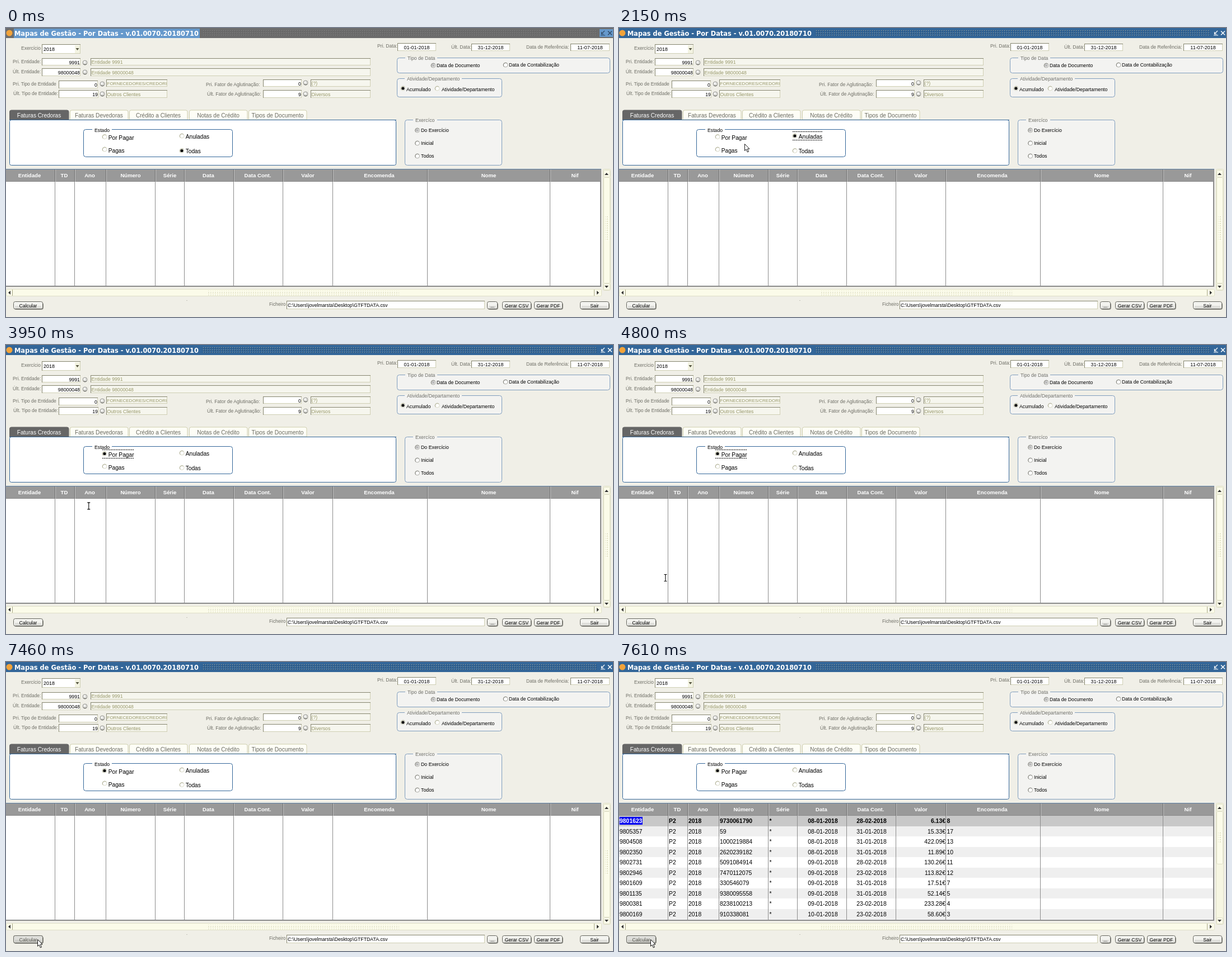
Write an HTML page that moves like this. It is 1084 by 517 pixels and loops after 8000 ms.

```html
<!DOCTYPE html>
<html lang="pt">
<head>
<meta charset="utf-8">
<title>Mapas de Gestão</title>
<style>
html, body { margin: 0; width: 100%; height: 100%; overflow: hidden; background: #f0efe7; }
svg { display: block; width: 100vw; height: 100vh; font-family: "Liberation Sans", Arial, sans-serif; }
text { white-space: pre; }
</style>
</head>
<body>
<svg id="stage" viewBox="0 0 1084 517"></svg>
<script>
const LOOP = 8000;
const BLUE = '#336699', GREY = '#6e6e66', OLIVE = '#98986a', BG = '#f0efe7', CREAM = '#fbfbe9';
const RIM = '#dfdfc8';
const stage = document.getElementById('stage');
let layer = stage;

function el(tag, attrs, parent = layer) {
  const node = document.createElementNS('http://www.w3.org/2000/svg', tag);
  for (const key in attrs) node.setAttribute(key, attrs[key]);
  parent.appendChild(node);
  return node;
}
// Boxes are given by their left, top, right and bottom edges.
const box = (l, t, r, b, fill) =>
  el('rect', { x: l, y: t, width: r - l, height: b - t, fill, 'shape-rendering': 'crispEdges' });
const frame = (l, t, r, b, stroke, fill = 'none', rx = 3) =>
  el('rect', { x: l + .5, y: t + .5, width: r - l - 1, height: b - t - 1, rx, fill, stroke });
const path = (d, attrs) => el('path', { d, fill: 'none', ...attrs });
const show = (node, on) => node.setAttribute('visibility', on ? 'visible' : 'hidden');

// Text is centred vertically on y by its capital height.
function label(x, y, words, size = 8.5, fill = GREY, anchor = 'start', extra = {}) {
  const node = el('text', { x, y: y + size * .36, 'font-size': size, fill, 'text-anchor': anchor, ...extra });
  node.textContent = words;
  return node;
}
function group(parent = stage) {
  layer = el('g', {}, parent);
  return layer;
}

function field(l, t, r, b, fill = '#fff') {
  box(l, t, r, b, '#85856f');
  box(l + 1, t + 1, r, b, '#cfcfb4');
  box(l + 1, t + 1, r - 1, b - 1, fill);
}
function numberField(l, t, r, b, value) {
  field(l, t, r, b);
  label(r - 1, (t + b) / 2 + 1, value, 8.8, '#000', 'end');
}
function readOnly(l, t, r, b, value, size = 8.7) {
  field(l, t, r, b, '#f6f6ee');
  label(l + 1.5, (t + b) / 2 + .5, value, size, OLIVE);
}
function dateField(l, t, r, b, value) {
  field(l, t, r, b);
  label((l + r) / 2, (t + b) / 2 + .5, value, 9, '#000', 'middle');
}
function lookup(x, y) {
  el('circle', { cx: x, cy: y, r: 4, fill: '#dcdcd8', stroke: '#8a8a86', 'stroke-width': .8 });
  path(`M${x - 2.5} ${y + 2.8}q2.5 2 5 0`, { stroke: '#55554f' });
  el('circle', { cx: x - .8, cy: y - 1.2, r: 1.6, fill: '#fff' });
}
function fieldset(l, t, r, b, x, width, stroke, fill) {
  frame(l, t, r, b, stroke, fill, 4);
  box(x - 4, t - 1, x + width + 4, t + 2, fill);
}
function radio(x, y, dot, faint) {
  el('circle', { cx: x, cy: y, r: 4, fill: '#fff', stroke: faint ? '#d6d6c2' : '#a2a29a', 'stroke-width': .9 });
  path(`M${x - 2.8} ${y + 2.8}A4 4 0 0 1 ${x + 2.8} ${y - 2.8}`,
    { stroke: faint ? '#a6a68c' : '#80807a', 'stroke-width': .9 });
  return el('circle', { cx: x, cy: y, r: 2.6, fill: dot || 'none' });
}
function button(l, r, words, hover) {
  frame(l + 1, 491, r + 1, 504, '#8a8a84', '#8a8a84');
  frame(l, 489, r, 503, '#66665f', hover ? '#dededa' : '#f3f3ef');
  box(l + 3, 497, r - 3, 502, hover ? '#cdcdc8' : '#dededa');
  label((l + r) / 2, 496.5, words, 8.7, hover ? '#55554f' : '#000', 'middle');
}
function dots(id, size, light, dark) {
  const p = el('pattern', { id, width: size, height: size, patternUnits: 'userSpaceOnUse' });
  el('rect', { width: 1.2, height: 1.2, fill: light }, p);
  el('rect', { x: 1.2, y: 1.2, width: 1.2, height: 1.2, fill: dark }, p);
}

function titleBar(base, plate, light, dark, icons, id) {
  const g = group();
  dots(id, 4, light, dark);
  box(0, 0, 1084, 18, base);
  box(14, 1, 346, 18, plate);
  box(350, 4, 1056, 14, `url(#${id})`);
  box(1060, 2, 1072, 16, plate);
  box(1072, 2, 1084, 16, plate);
  path('M1069 5l-5 5M1063.5 7v4h4M1062 13h8', { stroke: icons, 'stroke-width': 1.2 });
  path('M1075 5.5l7 7M1082 5.5l-7 7', { stroke: icons, 'stroke-width': 1.5 });
  return g;
}

function thumb(bottom, dotTop, dotBottom) {
  const g = group();
  frame(1067, 267, 1079, bottom, RIM, CREAM, 2);
  box(1070, dotTop, 1077, dotBottom, 'url(#grip)');
  return g;
}

// --- Window and title ---
box(0, 0, 1084, 517, BG);
dots('grip', 4, '#fff', '#b5b58f');
const idleBar = titleBar('#6c6c6c', '#6699cc', '#868686', '#5a5a5a', '#2f4a66', 'idleDots');
const activeBar = titleBar(BLUE, BLUE, '#a3a597', '#1f3c58', '#fff', 'activeDots');
group();
el('circle', { cx: 6, cy: 9, r: 5.5, fill: '#f2a33a' });
label(15, 9.5, 'Mapas de Gestão - Por Datas - v.01.0070.20180710', 11.4, '#fff', 'start',
  { 'font-family': '"DejaVu Sans", Verdana, sans-serif', 'font-weight': 'bold' });

// --- Filters on the left ---
label(27, 36, 'Exercício');
field(64, 29, 133, 46);
label(67, 38, '2018', 9, '#000');
box(123, 31, 132, 45, '#f3f3e2');
path('M124.5 36h6l-3 4z', { fill: '#55553f' });

label(12, 60, 'Pri. Entidade:', 8.4);
numberField(64, 54, 133, 67, '9991');
lookup(141, 62);
readOnly(151, 54, 651, 67, 'Entidade 9991');
label(12, 78, 'Últ. Entidade:', 8.4);
numberField(64, 72, 133, 86, '98000048');
lookup(141, 79);
readOnly(151, 72, 651, 86, 'Entidade 98000048');

label(12, 100, 'Pri. Tipo de Entidade', 8.4);
numberField(94, 94, 164, 108, '0');
lookup(172, 100);
readOnly(179, 92, 288, 105, 'FORNECEDORES/CREDORI', 8);
label(13, 117, 'Últ. Tipo de Entidade:', 8.4);
numberField(94, 111, 165, 125, '19');
lookup(172, 118);
readOnly(179, 111, 288, 125, 'Outros Clientes');

label(357, 101, 'Pri. Fator de Aglutinação:', 8.6);
numberField(459, 92, 528, 105, '0');
lookup(535, 98);
readOnly(544, 92, 651, 105, '(?)');
label(359, 118, 'Últ. Fator de Aglutinação:', 8.6);
numberField(459, 111, 528, 125, '9');
lookup(535, 118);
readOnly(544, 111, 651, 125, 'Diversos');

// --- Dates and groups on the right ---
label(663, 32, 'Pri. Data:', 8.6);
dateField(699, 27, 768, 41, '01-01-2018');
label(795, 34, 'Últ. Data:', 8.6);
dateField(831, 28, 900, 41, '31-12-2018');
label(929, 34, 'Data de Referência:', 8.6);
dateField(1008, 28, 1078, 41, '11-07-2018');

const SOFT = '#7f9dbd', PALE = '#f3f3f1';
fieldset(698, 53, 1079, 81, 717, 49, SOFT, PALE);
label(717, 54, 'Tipo de Data', 8.7);
radio(763, 67, '#bbb');
label(769, 66.5, 'Data de Documento', 8.7, '#000');
radio(892, 66);
label(898, 66, 'Data de Contabilização', 8.7, '#000');

fieldset(698, 90, 886, 124, 716, 94, SOFT, PALE);
label(716, 90.5, 'Atividade/Departamento', 8.8);
radio(709, 108, '#000', true);
label(715, 109.5, 'Acumulado', 8.7, '#000');
radio(770, 108, '', true);
label(778, 109.5, 'Atividade/Departamento', 8.8, '#000');

fieldset(712, 164, 886, 246, 731, 35, SOFT, PALE);
label(731, 165, 'Exercíco', 8.9);
['Do Exercício', 'Inicial', 'Todos'].forEach((words, i) => {
  radio(734.5, 183 + 23 * i, i ? '' : '#bbb');
  label(741, 182.5 + 23 * i, words, 8.8, '#000');
});

// --- Tabs ---
frame(6, 164, 697, 246, BLUE, '#fff');
['Faturas Credoras', 'Faturas Devedoras', 'Crédito a Clientes', 'Notas de Crédito', 'Tipos de Documento']
  .forEach((words, i) => {
    const l = Math.round(6 + 106.6 * i) + (i ? 1 : 0), r = l + (i ? 104 : 106);
    path(`M${l + .5} 164V150q0-3 3-3H${r - 3}q3 0 3 3V164z`,
      { fill: i ? '#fdfdf6' : '#666', stroke: i ? '#cfcfae' : '#666' });
    label((l + r) / 2, 156.5, words, 10.1, i ? '#6a6a62' : '#fff', 'middle');
  });
box(6, 164, 697, 165, BLUE);

fieldset(138, 181, 405, 231, 158, 27, BLUE, '#fff');
label(158, 182.5, 'Estado', 8.7, '#000');
function option(x, y, words, textY, width, top) {
  const dot = radio(x, y, '', true);
  label(x + 6.7, textY, words, 10.2, '#000');
  const focus = path(`M${x - 4} ${top + .5}h${width}M${x - 4} ${top + 15.5}h${width}`,
    { stroke: '#000', 'stroke-dasharray': '2 1', 'shape-rendering': 'crispEdges' });
  return { dot, focus };
}
const options = {
  due: option(176, 194.5, 'Por Pagar', 196, 56, 187),
  paid: option(176, 217, 'Pagas', 219, 41, 210),
  void: option(314, 193, 'Anuladas', 194.5, 53, 185),
  all: option(314, 219.5, 'Todas', 220.5, 40, 212)
};

// --- Table ---
const EDGES = [88, 123, 179, 267, 319, 407, 495, 584, 753, 972];
const HEADS = [['Entidade', 42], ['TD', 104], ['Ano', 149.5], ['Número', 222.5], ['Série', 292.5],
  ['Data', 361.5], ['Data Cont.', 449.5], ['Valor', 539], ['Encomenda', 666.5], ['Nome', 862], ['Nif', 1016]];
const RECORDS = `9801623 9730061790 08-01 28-02 6.13 8
9805357 59 08-01 31-01 15.33 17
9804508 1000219884 08-01 31-01 422.09 13
9802350 2620239182 08-01 31-01 11.89 10
9802731 5091084914 09-01 28-02 130.26 11
9802946 7470112075 09-01 23-02 113.82 12
9801609 330546079 09-01 31-01 17.51 7
9801135 9380095558 09-01 31-01 52.14 5
9800381 8238100213 09-01 23-02 233.28 4
9800169 910338081 10-01 23-02 58.60 3`.split('\n').map(line => line.split(' '));

box(0, 252, 1063, 463, '#8a8a8a');
box(0, 252, 1063, 253, '#5d7fa3');
box(0, 275, 1061, 461, '#fff');
box(0, 253, 1062, 274, '#999');
HEADS.forEach(([words, x]) =>
  label(x, 264, words, 9.6, '#fff', 'middle', { 'font-weight': 'bold' }));

const rows = group();
RECORDS.forEach(([entity, number, date, posted, value, order], i) => {
  const y = 284.5 + 18.52 * i, weight = { 'font-weight': i ? 'normal' : 'bold' };
  box(0, Math.round(y - 9.5), 1061, Math.min(461, Math.round(y + 9)), i ? (i % 2 ? '#efefef' : '#fff') : '#c8c8c8');
  if (!i) box(1, 277, 42, 291, '#0000f0');
  const cell = (x, words, anchor, fill = '#000') => label(x, y, words, 10.45, fill, anchor, weight);
  cell(1, entity, 'start', i ? '#000' : '#fff');
  cell(89, 'P2');
  cell(124, '2018');
  cell(180, number);
  cell(268.5, '*');
  cell(364, date + '-2018', 'middle');
  cell(451, posted + '-2018', 'middle');
  cell(583, value + '€', 'end');
  cell(585.5, order);
});
group();
EDGES.forEach(x => {
  box(x - 1, 253, x, 275, '#6e6e6e');
  box(x, 253, x + 1, 275, '#c4c4c4');
  box(x - 1, 275, x, 461, '#8c8c8c');
});

// --- Scroll bars ---
frame(1066, 252, 1080, 470, RIM, '#f6f6e2', 2);
frame(1067, 254, 1079, 267, RIM, CREAM, 2);
path('M1069 263h7l-3.5-4z', { fill: '#333' });
frame(1067, 457, 1079, 469, RIM, CREAM, 2);
path('M1069 461h7l-3.5 4z', { fill: '#333' });
const longThumb = thumb(457, 335, 381);
const shortThumb = thumb(362, 303, 323);
group();
frame(0, 467, 1064, 480, RIM, CREAM, 2);
box(11, 468, 12, 479, '#a9a988');
box(1050, 468, 1051, 479, '#a9a988');
path('M8 470v7l-4-3.5z', { fill: '#333' });
path('M1055 470v7l4-3.5z', { fill: '#333' });
box(360, 470, 702, 478, 'url(#grip)');

// --- Bottom line ---
button(13, 66, 'Calcular');
const hotButton = group();
button(13, 66, 'Calcular', true);
group();
box(322, 487, 324, 488, '#c4c4ba');
label(470, 494.5, 'Ficheiro', 8.3);
field(501, 488, 855, 503);
label(503, 496, 'C:\\Users\\jovelmarsta\\Desktop\\GTFTDATA.csv', 8.75, '#000');
button(859, 878, '...');
button(886, 938, 'Gerar CSV');
button(943, 994, 'Gerar PDF');
button(1025, 1077, 'Sair');

// --- Pointers, drawn with the hot spot at the origin ---
const pointer = group();
const arrow = path('M.5 .5V12.5L3.2 10L5.4 15L7.5 14.1L5.3 9.2H9z', { fill: '#fff', stroke: '#000', 'stroke-width': .9 });
const beam = path('M-2.5 -6H-.6L0 -5.4L.6 -6H2.5M0 -5.5V5.5M-2.5 6H-.6L0 5.4L.6 6H2.5', { stroke: '#000', 'stroke-width': 1.1 });
const busy = group(pointer);
el('circle', { cx: .5, cy: .5, r: 6.3, fill: 'none', stroke: '#3fa3d8', 'stroke-width': 3.4 });
const glint = path('M-5.8 .5A6.3 6.3 0 0 1 .5 -5.8', { stroke: '#b5e4f7', 'stroke-width': 2.4 });

// Each move: first step, last step, number of steps, end point.
const MOVES = [
  [100, 100, 1, 680, 441.5], [250, 490, 4, 430, 229], [700, 1290, 9, 328, 195],
  [1840, 2150, 5, 224, 207], [2230, 2480, 4, 187, 222], [2770, 3000, 4, 190, 197],
  [3320, 3320, 1, 190, 213], [3700, 4340, 9, 95, 381.5], [4580, 4800, 4, 83, 416.5],
  [5130, 5290, 3, 83, 470], [5360, 5590, 4, 56, 496]
];
function pointerAt(t) {
  let x = 726.5, y = 449.5;
  for (const [from, to, count, endX, endY] of MOVES) {
    if (t < from) break;
    const done = to > from ? 1 + Math.floor((t - from) / (to - from) * (count - 1) + 1e-6) : 1;
    const k = Math.min(done, count) / count;
    x += (endX - x) * k;
    y += (endY - y) * k;
  }
  return [x, y];
}

// Latest value whose start time has passed.
const pick = (t, steps) => steps.reduce((now, [at, value]) => t >= at ? value : now, '');
const CHOSEN = [[0, 'all'], [1510, 'void'], [2700, 'paid'], [3240, 'due']];
const PRESSED = [[1370, 'void'], [1510, ''], [2560, 'paid'], [2700, ''], [3170, 'due'], [3240, '']];
const FOCUSED = [[1440, 'void'], [2630, 'paid'], [3170, 'due'], [5820, '']];

function draw(t) {
  const chosen = pick(t, CHOSEN), pressed = pick(t, PRESSED), focused = pick(t, FOCUSED);
  for (const name in options) {
    const { dot, focus } = options[name], down = name === pressed;
    dot.setAttribute('fill', down ? '#949494' : name === chosen ? '#000' : 'none');
    dot.setAttribute('r', down ? 4 : 2.6);
    show(focus, name === focused);
  }
  const filled = t >= 7530, waiting = t >= 5820 && t < 7460;
  show(idleBar, t < 1440);
  show(activeBar, t >= 1440);
  show(rows, filled);
  show(longThumb, !filled);
  show(shortThumb, filled);
  show(hotButton, t >= 5590);

  const [x, y] = pointerAt(t), overTable = y > 275 && y < 461, seen = t >= 70;
  pointer.setAttribute('transform', `translate(${x} ${y})`);
  show(arrow, seen && !overTable && !waiting);
  show(beam, seen && overTable);
  show(busy, waiting);
  glint.setAttribute('transform', `rotate(${t < 7150 ? 0 : 120} .5 .5)`);
}

const start = performance.now();
function tick() {
  draw((performance.now() - start) % LOOP);
  requestAnimationFrame(tick);
}
draw(0);
tick();
</script>
</body>
</html>
```
